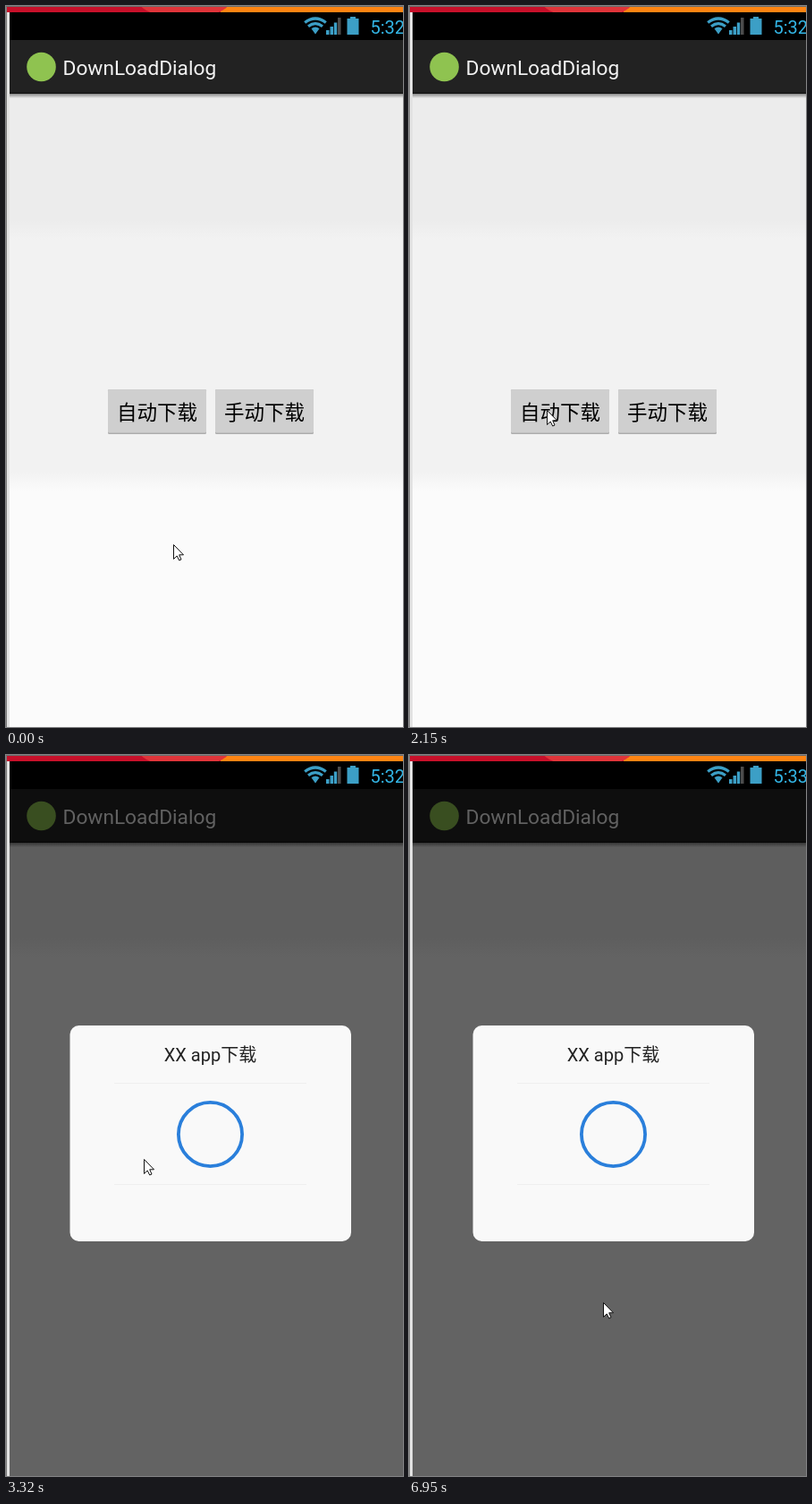
Recreate the animation shown at these times as an HTML page. Size 444 by 805 pixels, loop 8000 ms.

```html
<!DOCTYPE html>
<html lang="zh">
<head>
<meta charset="utf-8">
<title>DownLoadDialog</title>
<style>
  html, body { margin: 0; width: 100%; height: 100%; overflow: hidden; background: #fbfbfb; }
  svg { display: block; position: absolute; left: 0; top: 0; }
  text { font-family: Roboto, "Noto Sans CJK SC", "Noto Sans CJK", sans-serif; }
  .btn text { font-size: 22.5px; text-anchor: middle; }
  .off { display: none; }
</style>
</head>
<body>
<svg width="444" height="805" viewBox="0 0 444 805">
  <defs>
    <linearGradient id="shade" x2="0" y2="1">
      <stop offset="0" stop-color="#000" stop-opacity=".42"/>
      <stop offset="1" stop-color="#000" stop-opacity="0"/>
    </linearGradient>
    <clipPath id="strip"><rect y="1" width="444" height="6"/></clipPath>
  </defs>

  <!-- window edge -->
  <rect width="444" height="805" fill="#e2e2e2"/>
  <rect width="1" height="805" fill="#7c7c7c"/>
  <rect width="444" height="1" fill="#6c6c6c"/>
  <g clip-path="url(#strip)">
    <rect x="1" width="239" height="7" fill="#c8102a"/>
    <rect x="240" width="204" height="7" fill="#ff8412"/>
    <ellipse cx="199.500" cy="-4" rx="50" ry="17" fill="#e0343a"/>
  </g>

  <!-- page -->
  <g id="page"></g>
  <rect x="4" y="98" width="440" height="5" fill="url(#shade)"/>
  <g id="buttons"></g>

  <!-- action bar -->
  <rect x="4" y="38" width="440" height="60" fill="#222"/>
  <rect x="4" y="96.500" width="440" height="1.500" fill="#161616"/>
  <circle cx="39.500" cy="68" r="16.300" fill="#8fc350"/>
  <text x="63.500" y="77" font-size="22.700" fill="#f3f3f3">DownLoadDialog</text>
  <rect id="dim" x="4" y="38" width="440" height="60"/>

  <!-- status bar -->
  <rect x="4" y="7" width="440" height="31"/>
  <g fill="none" stroke="#3c9fc6" stroke-width="3.200">
    <path d="M334.200 18.500Q346 9.500 357.800 18.500M338 22.700Q346 16.500 354 22.700"/>
    <path d="M341.500 25.300Q346 21.800 350.500 25.300L346 31.500Z" fill="#3c9fc6" stroke="none"/>
  </g>
  <g fill="#3c9fc6">
    <path d="M358 27h3.500v5h-3.500zM362.500 23h3.500v9h-3.500zM366.800 18.500h3.400v13.500h-3.400z"/>
    <path d="M371 13h3.500v19h-3.500z" fill="#4c4c4c"/>
    <path d="M385 12h6v2h3.500v18h-13v-18h3.500z"/>
  </g>
  <text id="clock" x="407.500" y="30.500" font-size="20" fill="#33b5e5"></text>

  <!-- dialog -->
  <g id="dialog">
    <rect x="71.500" y="302" width="314.500" height="241" rx="10" fill="#f9f9f9"/>
    <text x="228.500" y="342" font-size="20" text-anchor="middle" fill="#222">XX app下载</text>
    <path d="M121 366.500H336M121 479.500H336" stroke="#efefef"/>
    <circle cx="228.500" cy="423.500" r="35.600" fill="none" stroke="#2a7fdb" stroke-width="3.800"/>
  </g>

  <path id="pointer" d="M.5.5V16.500L4.200 13L6.700 18L9 17L6.700 11.800H11.500Z"
        fill="#fff" stroke="#111" stroke-width="1"/>
</svg>
<script>
const LOOP = 8000;
const $ = id => document.getElementById(id);

// [time, x, y] of the pointer tip
const path = [
  [0, 187, 601], [150, 178, 589], [430, 178, 586], [570, 175, 578], [690, 175, 571],
  [970, 168, 582], [1100, 166, 592], [1240, 181, 586], [1360, 182, 577], [1480, 179, 563],
  [1630, 167, 530], [1750, 157, 506], [1900, 154, 469], [2150, 154, 451],
  [4850, 169, 478], [5000, 192, 555], [5120, 209, 610], [5490, 213, 611], [5610, 217, 611]
];
// [time, value] steps
const dims = [[0, 0], [3200, 1], [3320, 2]];
const presses = [[0, false], [2430, true], [2950, false]];
const clocks = [[0, '5:32'], [6950, '5:33']];

// page tones per dim level: shades, then the heights where they meet
const tones = [
  { shades: ['#ececec', '#f2f2f2', '#fbfbfb'], edges: [250, 531], alpha: 0 },
  { shades: ['#8d8d8d', '#939393'], edges: [355], alpha: .4 },
  { shades: ['#5e5e5e', '#636363'], edges: [215], alpha: .6 }
];
const SOFT = 11;

function bands({ shades, edges }, i) {
  const stops = [];
  edges.forEach((y, k) => stops.push([y - SOFT, shades[k]], [y + SOFT, shades[k + 1]]));
  const tags = stops.map(([y, c]) => `<stop offset="${(y - 98) / 707}" stop-color="${c}"/>`).join('');
  return `<linearGradient id="tone${i}" x2="0" y2="1">${tags}</linearGradient>
    <rect class="tone" x="4" y="98" width="440" height="707" fill="url(#tone${i})"/>`;
}

function button(x, label) {
  return `<g class="btn">
    <rect class="halo off" x="${x - 5}" y="422.500" width="120" height="60.500" rx="4" fill="#33b5e5" opacity=".4"/>
    <rect x="${x}" y="428" width="110" height="50" rx="1.500" fill="#adadad"/>
    <rect class="face" x="${x}" y="428" width="110" height="48.500" rx="1.500" fill="#cfcfcf"/>
    <text x="${x + 55}" y="461.500">${label}</text></g>`;
}

$('page').innerHTML = tones.map(bands).join('');
$('buttons').innerHTML = button(114, '自动下载') + button(234, '手动下载');
const layers = document.querySelectorAll('.tone');
const halo = document.querySelector('.halo');
const face = document.querySelector('.face');

function at(steps, t) {
  let hit = steps[0];
  for (const s of steps) if (s[0] <= t) hit = s;
  return hit;
}

function draw(t) {
  const [, x, y] = at(path, t);
  const level = at(dims, t)[1];
  const pressed = at(presses, t)[1];
  $('pointer').setAttribute('transform', `translate(${x} ${y})`);
  layers.forEach((el, i) => el.classList.toggle('off', i !== level));
  $('dim').setAttribute('opacity', tones[level].alpha);
  $('dialog').classList.toggle('off', level === 0);
  halo.classList.toggle('off', !pressed);
  face.setAttribute('fill', pressed ? '#8fc6dc' : '#cfcfcf');
  $('clock').textContent = at(clocks, t)[1];
}

const start = performance.now();
function tick(now) {
  draw(Math.max(0, now - start) % LOOP);
  requestAnimationFrame(tick);
}
draw(0);
requestAnimationFrame(tick);
</script>
</body>
</html>
```
